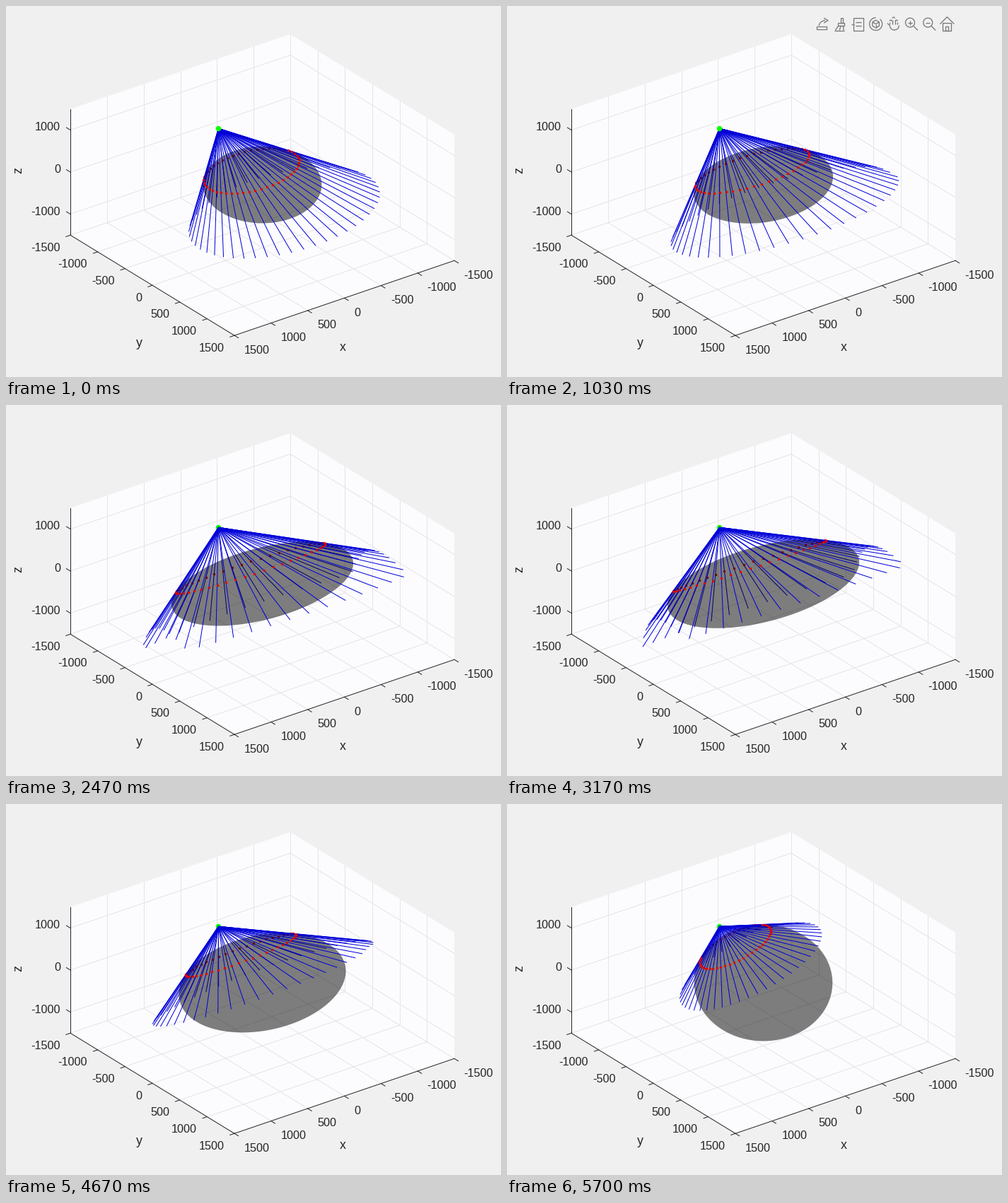
Animation of 700 by 525 pixels, one loop 5.73 s. Source, as a matplotlib script:

```python
import numpy as np
import matplotlib.pyplot as plt
from matplotlib.animation import FuncAnimation
from matplotlib.collections import LineCollection
from matplotlib.patches import Polygon

W, H, DPI = 700, 525, 100
PX = 72 / DPI
STEP, FRAMES = 30, 191
RAYS, LAST = 49, 171
LIM = 1500
TICKS = np.arange(-LIM, LIM + 1, 500)
INK, GRID = "#262626", "#e4e4ea"

# Orthographic view: data axes to screen pixels, y down
VIEW = np.array([[-0.10367, 0.07733, 0], [0.03533, 0.04733, -0.0595]])
CENTER = np.array([362.5, 253.0])
APEX = np.array([300.0, -400.0, 1200.0])

plt.rcParams["font.family"] = "Liberation Sans"
fig = plt.figure(figsize=(W / DPI, H / DPI), dpi=DPI, facecolor="#f0f0f0")
ax = fig.add_axes([0, 0, 1, 1])
ax.set(xlim=(0, W), ylim=(H, 0))
ax.axis("off")


def project(*p):
    return CENTER + VIEW @ p


def stroke(a, b, color):
    ax.plot([a[0], b[0]], [a[1], b[1]], color=color, lw=PX, zorder=1)


def label(pos, text, ha="center", size=16.2, **kw):
    ax.text(*pos, text, ha=ha, va="center_baseline", fontsize=size * PX, color=INK, **kw)


def tick(p, direction, offset, text, ha):
    stroke(p, p + direction, INK)
    label(p + offset, text, ha)


def draw_box():
    lo, hi = -LIM, LIM
    for axis in range(3):
        square = np.array([[lo, lo], [hi, lo], [hi, hi], [lo, hi]])
        wall = np.insert(square, axis, lo, axis=1)
        ax.add_patch(Polygon([project(*p) for p in wall], fc="#fcfcfe", ec="none", zorder=0))

    for t in TICKS[:-1]:
        stroke(project(t, lo, lo), project(t, hi, lo), GRID)
        stroke(project(lo, t, lo), project(hi, t, lo), GRID)
        stroke(project(t, lo, lo), project(t, lo, hi), GRID)
        stroke(project(lo, t, lo), project(lo, t, hi), GRID)
    for t in (-1000, 0, 1000):
        stroke(project(hi, lo, t), project(lo, lo, t), GRID)
        stroke(project(lo, lo, t), project(lo, hi, t), GRID)

    corner, left = project(hi, hi, lo), project(hi, lo, lo)
    for a, b in ((corner, left), (corner, project(lo, hi, lo)), (left, project(hi, lo, hi))):
        stroke(a, b, INK)

    along_x, along_y = VIEW[:, 0] * 60, VIEW[:, 1] * 72
    for t in TICKS:
        tick(project(t, hi, lo), along_y, (13.5, 19.5), str(t), "left")
        tick(project(hi, t, lo), along_x, (-14.5, 16.5), str(t), "right")
    for t in (-1000, 0, 1000):
        tick(project(hi, lo, t), -along_y, (-14, -5), str(t), "right")
    label((476, 482), "x", size=17.8)
    label((188, 475), "y", size=17.8)
    label((18, 235), "z", size=17.8, rotation=90)


def arc(r, start=0, end=360, n=30, x=0, y=0):
    t = np.radians(np.linspace(start, end, n))
    return np.column_stack([x + r * np.cos(t), y + r * np.sin(t)])


def rect(x0, y0, x1, y1):
    return [(x0, y0), (x1, y0), (x1, y1), (x0, y1), (x0, y0)]


def bar(x0, y0, x1, y1):
    return [(x0, y0), (x1, y1)]


def draw_toolbar():
    lens = [arc(6.5, x=-2, y=-2), bar(3, 3, 9, 9), bar(-5, -2, 1, -2)]
    export = [rect(-8, 3, 6, 7), arc(9, 190, 270, x=4, y=4), arc(4, -120, 120, 3, x=4, y=-5)]
    brush = [rect(1, -9, 4, -2), rect(-3, -2, 6, 2)]
    brush += [bar(x, 2, 2 * x - 3, 9) for x in (-2, 1, 4)] + [bar(-8, 9, 6, 9)]
    tip = [rect(-6, -9, 8, 9), bar(-9, 0, -5, 0), bar(-3, -3, 5, -3), bar(-3, 2, 5, 2)]
    cube = [arc(9, -50, 270), arc(5.5, 30, 390, 7)]
    cube += [bar(0, 0, *p) for p in arc(5.5, 90, 330, 3)]
    hand = [arc(6.5, 0, 180, x=1, y=2), bar(-5.5, 2, -9, -1)]
    hand += [arc(1.6, 180, 360, x=x, y=-8 + abs(x)) for x in (-4, 0, 4)]
    hand += [bar(x, -8 + abs(x), x, 0) for x in (-5.6, -2, 2, 5.6)]
    home = [arc(10, 180, 360, 3), rect(-6, -2, 6, 9), rect(-2, 3, 2, 9)]

    icons = [export, brush, tip, cube, hand, lens + [bar(-2, -5, -2, 1)], lens, home]
    lines = [np.add(part, (446 + 25.2 * i, 25.5)) for i, icon in enumerate(icons) for part in icon]
    return ax.add_collection(LineCollection(lines, colors="#787878", linewidths=1.3 * PX))


def shape_matrix(k):
    """Ellipsoid as a covariance: it swells along x, thins along y, then rises in z."""
    u = k / LAST
    xx = 335 + 190 * u + 1160 * np.exp(-((k - 97) / 60) ** 2)
    yy = 200 + 222 * np.exp(-((k / 45) ** 2))
    zz = 420 + 1510 * u ** 3.5
    xz = 345 * u ** 1.3
    return 1000 * np.array([[xx, 0, xz], [0, yy, 0], [xz, 0, zz]])


def contact_ring(shape, k):
    """Points where rays from the apex touch the ellipsoid."""
    root = np.linalg.cholesky(shape)  # maps the unit sphere onto the ellipsoid
    q = np.linalg.solve(root, APEX)
    dist = np.linalg.norm(q)
    q /= dist
    left = -root.T @ VIEW[0]
    left -= (left @ q) * q
    left /= np.linalg.norm(left)
    down = np.cross(q, left)
    phase = -1.05 * np.tanh((k - 58) / 50)
    t = (np.arange(RAYS)[:, None] + phase) * 2 * np.pi / RAYS
    circle = q / dist + np.sqrt(1 - dist ** -2) * (np.cos(t) * left + np.sin(t) * down)
    return circle @ root.T


def ray_ends(ring):
    """Rays run twice as far as the contact, cut off at the box."""
    d = ring - APEX
    room = (np.sign(d) * LIM - APEX) / np.where(d == 0, 1e-9, d)
    return APEX + d * np.minimum(2, np.abs(room).min(axis=1))[:, None]


draw_box()
toolbar = draw_toolbar()
tip = project(*APEX)
solid = ax.add_patch(Polygon(np.zeros((3, 2)), fc="black", ec="none", alpha=0.5, zorder=4))


def ray_layer(z):
    rays = LineCollection([], colors="#0000d8", linewidths=PX, zorder=z)
    dots, = ax.plot([], [], "o", color="#e00000", ms=3.4 * PX, mew=0, zorder=z + 0.5)
    return ax.add_collection(rays), dots


back_layer, front_layer = ray_layer(3), ray_layer(5)
apex_dot, = ax.plot(*tip, "o", color="#00ff00", ms=7.5 * PX, mew=0)


def fill(layer, touch, ends):
    rays, dots = layer
    rays.set_segments([(tip, e) for e in ends])
    dots.set_data(*touch.T)


def update(j):
    k = round(0.9 * j + 0.3)  # the motion advances 30 steps per second
    shape = shape_matrix(k)
    ring = contact_ring(shape, k)
    touch = CENTER + ring @ VIEW.T
    ends = CENTER + ray_ends(ring) @ VIEW.T

    flat = VIEW @ shape @ VIEW.T
    solid.set_xy(CENTER + arc(1, n=160) @ np.linalg.cholesky(flat).T)
    front = (touch - CENTER) @ np.linalg.solve(flat, tip - CENTER) <= 1
    fill(back_layer, touch[~front], ends[~front])
    fill(front_layer, touch[front], ends[front])
    apex_dot.set_zorder(7 if k < 62 else 4.5)
    toolbar.set_visible(27 <= k < 51)
    return solid, *back_layer, *front_layer, apex_dot, toolbar


anim = FuncAnimation(fig, update, frames=FRAMES, interval=STEP, repeat=True,
                     repeat_delay=0, blit=False)
plt.show()
```
